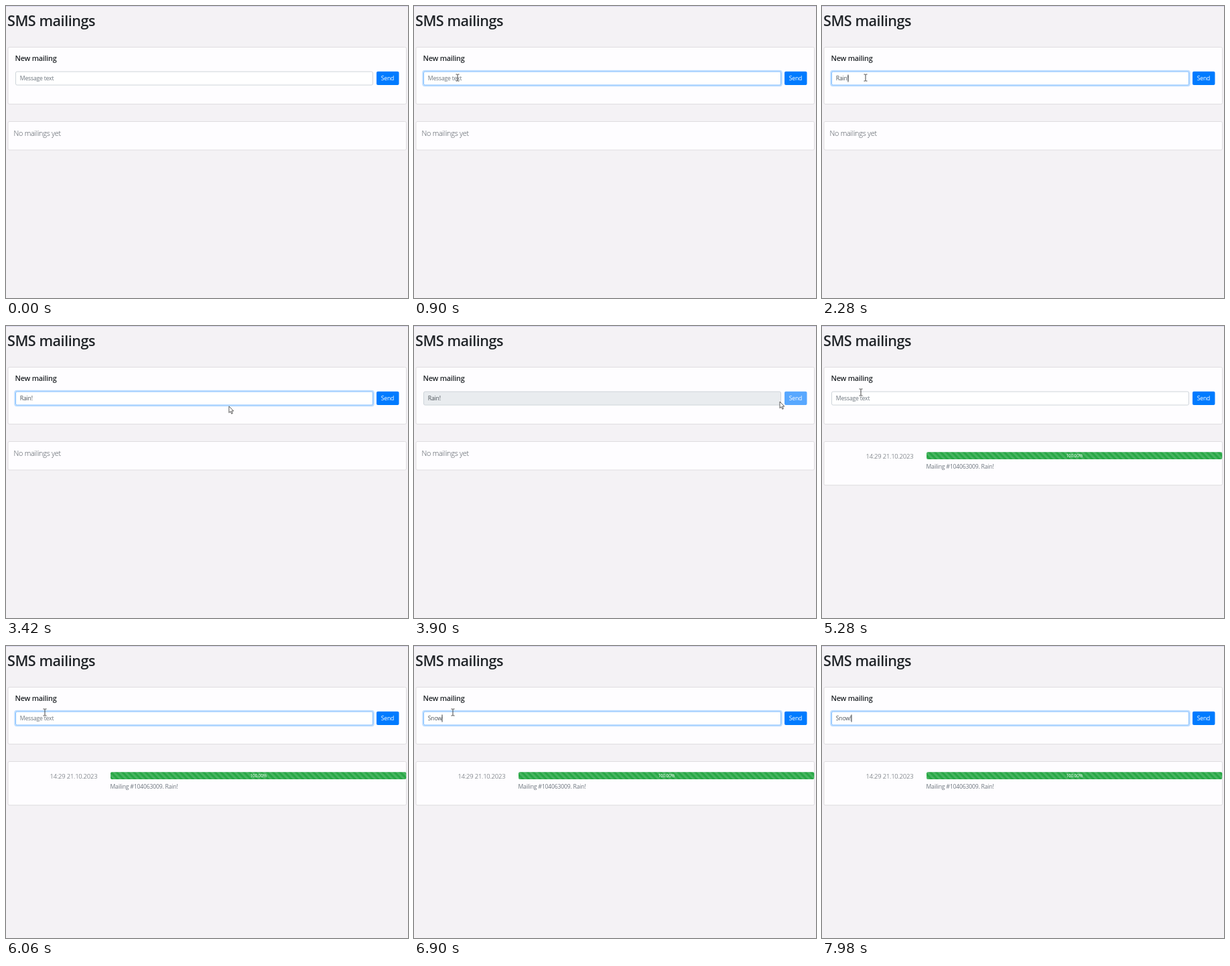
Recreate the animation shown at these times as an HTML page. Size 600 by 436 pixels, loop 8000 ms.

```html
<!DOCTYPE html>
<html lang="en">
<head>
<meta charset="utf-8">
<title>SMS mailings</title>
<style>
  html, body { margin: 0; width: 100%; height: 100%; overflow: hidden; background: #f4f2f5; }
  svg { display: block; }
  text { font: 8.64px "Open Sans", "Noto Sans", sans-serif; letter-spacing: -.022em; fill: #6c757d; white-space: pre; }
  .h1 { font-size: 21.6px; font-weight: 600; fill: #212529; }
  .h2 { font-size: 10.8px; font-weight: 600; fill: #212529; }
  .lead { font-size: 10.8px; font-weight: 300; fill: #495057; }
  .date { font-size: 9.5px; font-weight: 300; fill: #495057; }
  .pct { font-size: 6.4px; fill: #fff; text-anchor: middle; }
  .tip { font-size: 6.8px; fill: #575757; }
  .card { fill: #fefdff; stroke: #dfdde0; }
</style>
</head>
<body>
<svg width="600" height="436">
  <defs>
    <pattern id="stripes" width="8.64" height="20" patternUnits="userSpaceOnUse">
      <rect width="8.64" height="20" fill="#28a745"/>
      <rect width="4.32" height="20" fill="#fff" opacity=".15"/>
    </pattern>
  </defs>
  <rect width="600" height="1" fill="#d6d4ea"/>
  <text class="h1" x="2" y="30">SMS mailings</text>

  <rect class="card" x="3" y="61.5" width="594.5" height="85" rx="2"/>
  <text class="h2" x="13.5" y="82">New mailing</text>
  <rect id="ring" x="13.2" y="96.7" width="535.6" height="22.6" rx="3" fill="none" stroke="#bfdeff" stroke-width="2"/>
  <rect id="field" x="14.5" y="98" width="533" height="20" rx="2"/>
  <text id="entry" x="20.8" y="111.2"></text>
  <rect id="caret" y="102.5" width="1" height="11" fill="#343a40"/>
  <rect id="btnRing" x="552" y="96.7" width="35.6" height="22.4" rx="3" fill="#bfdeff"/>
  <g id="button">
    <rect x="553" y="97.7" width="33.5" height="20.4" rx="2" fill="#007bff"/>
    <text x="559.8" y="111.1" style="fill:#fff">Send</text>
  </g>

  <rect id="list" class="card" x="3" y="172.5" width="594.5" height="42.5" rx="2"/>
  <text id="empty" class="lead" x="11.5" y="193.7">No mailings yet</text>
  <g id="row">
    <text class="date" x="65.5" y="198">14:29 21.10.2023</text>
    <rect x="156" y="188.3" width="441.3" height="10.7" rx="2" fill="#e9ecef"/>
    <rect id="bar" x="156" y="188.3" height="10.7" rx="2" fill="url(#stripes)"/>
    <text id="pct" class="pct" y="195.6">100.00%</text>
    <text x="155.5" y="213">Mailing #104063009. Rain!</text>
  </g>

  <g id="tip">
    <rect x="549.5" y="121.5" width="96" height="15" fill="#fff" stroke="#636363"/>
    <text class="tip" x="554" y="131.6">Please fill out this field.</text>
  </g>
  <path id="beam" d="M-2.5-5h2l.5.5.5-.5h2M0-4.5v9M-2.5 5h2l.5-.5.5.5h2" fill="none" stroke="#444"/>
  <path id="arrow" d="M0 0v9.6l2.2-2 1.6 3.6 1.6-.7-1.6-3.5h3z" fill="#fff" stroke="#333" stroke-width=".8"/>
</svg>
<script>
const LOOP = 8000, BLINK = 300, TILE = 8.64, BAR = 441.3;
const el = {};
document.querySelectorAll('[id]').forEach(e => el[e.id] = e);

// Each edit: start, text, focused
const edits = [
  [0, '', 0], [600, '', 1],
  [1380, 'R', 1], [1740, 'Ra', 1], [1860, 'Rai', 1], [1980, 'Rain', 1], [2280, 'Rain!', 1],
  [3780, 'Rain!', 0], [4020, '', 0], [5700, '', 1],
  [6300, 'S', 1], [6540, 'Sn', 1], [6660, 'Sno', 1], [6840, 'Snow', 1], [7140, 'Snow!', 1]
];
// Pointer stops: time, x, y
const stops = [
  [60, 120, 28], [330, 75, 180], [600, 65, 107],
  [3060, 65, 107], [3400, 330, 120], [3720, 560, 113],
  [3840, 560, 113], [3900, 546, 113], [3960, 545, 113],
  [4320, 545, 113], [4680, 9, 95], [4920, 36, 77], [5220, 58, 99], [7600, 58, 99]
];

const clamp = v => Math.max(0, Math.min(1, v));
const ease = v => v * v * (3 - 2 * v);
const show = (e, on) => e.setAttribute('visibility', on ? 'visible' : 'hidden');
const set = (e, attrs) => { for (const k in attrs) e.setAttribute(k, attrs[k]); };

function pointer(t) {
  const i = stops.findIndex(s => s[0] > t);
  if (i < 1) return null;
  const [t0, x0, y0] = stops[i - 1], [t1, x1, y1] = stops[i];
  const k = ease((t - t0) / (t1 - t0));
  return [x0 + (x1 - x0) * k, y0 + (y1 - y0) * k];
}

// The pointer turns into a text beam over the field and over text
function overText(x, y, disabled) {
  const inside = (l, t, r, b) => x >= l && x <= r && y >= t && y <= b;
  return inside(14, 98, 548, 118) && !disabled || inside(3, 12, 133, 36) ||
    inside(14, 72, 75, 86) || inside(12, 183, 82, 197);
}

function draw(t) {
  const [start, text, focus] = edits.filter(e => e[0] <= t).pop();
  const disabled = t >= 3900 && t < 4020;
  const sent = t >= 3960;

  el.entry.textContent = text || 'Message text';
  el.entry.style.fill = text ? '#495057' : '#6c757d';
  set(el.field, { fill: disabled ? '#e9ecef' : '#fff', stroke: focus ? '#80bdff' : '#ced4da' });
  show(el.ring, focus);
  show(el.caret, focus && Math.floor((t - start) / BLINK) % 2 === 0);
  el.caret.setAttribute('x', Math.round(20.5 + (text ? el.entry.getComputedTextLength() : 0)) - .5);
  show(el.btnRing, t >= 3780 && t < 3900);
  el.button.setAttribute('opacity', disabled ? .65 : 1);

  show(el.empty, !sent);
  show(el.row, sent);
  el.list.setAttribute('height', sent ? 65.2 : 42.5);
  const width = BAR * ease(clamp((t - 4000) / 260));
  el.bar.setAttribute('width', width);
  el.pct.setAttribute('x', 156 + width / 2);
  show(el.pct, sent && width > 30);
  const shift = 156 - (t - 3960) / 565 % 1 * TILE;
  el.stripes.setAttribute('patternTransform', `translate(${shift} 188.3) skewX(45)`);

  show(el.tip, t >= 4260 && t < 4500);
  const at = pointer(t);
  const beam = at && overText(...at, disabled);
  show(el.beam, beam);
  show(el.arrow, at && !beam);
  if (at) {
    const move = `translate(${at[0]} ${at[1]})`;
    el.beam.setAttribute('transform', move);
    el.arrow.setAttribute('transform', move);
  }
}

const begin = performance.now();
function tick() {
  draw((performance.now() - begin) % LOOP);
  requestAnimationFrame(tick);
}
tick();
</script>
</body>
</html>
```
